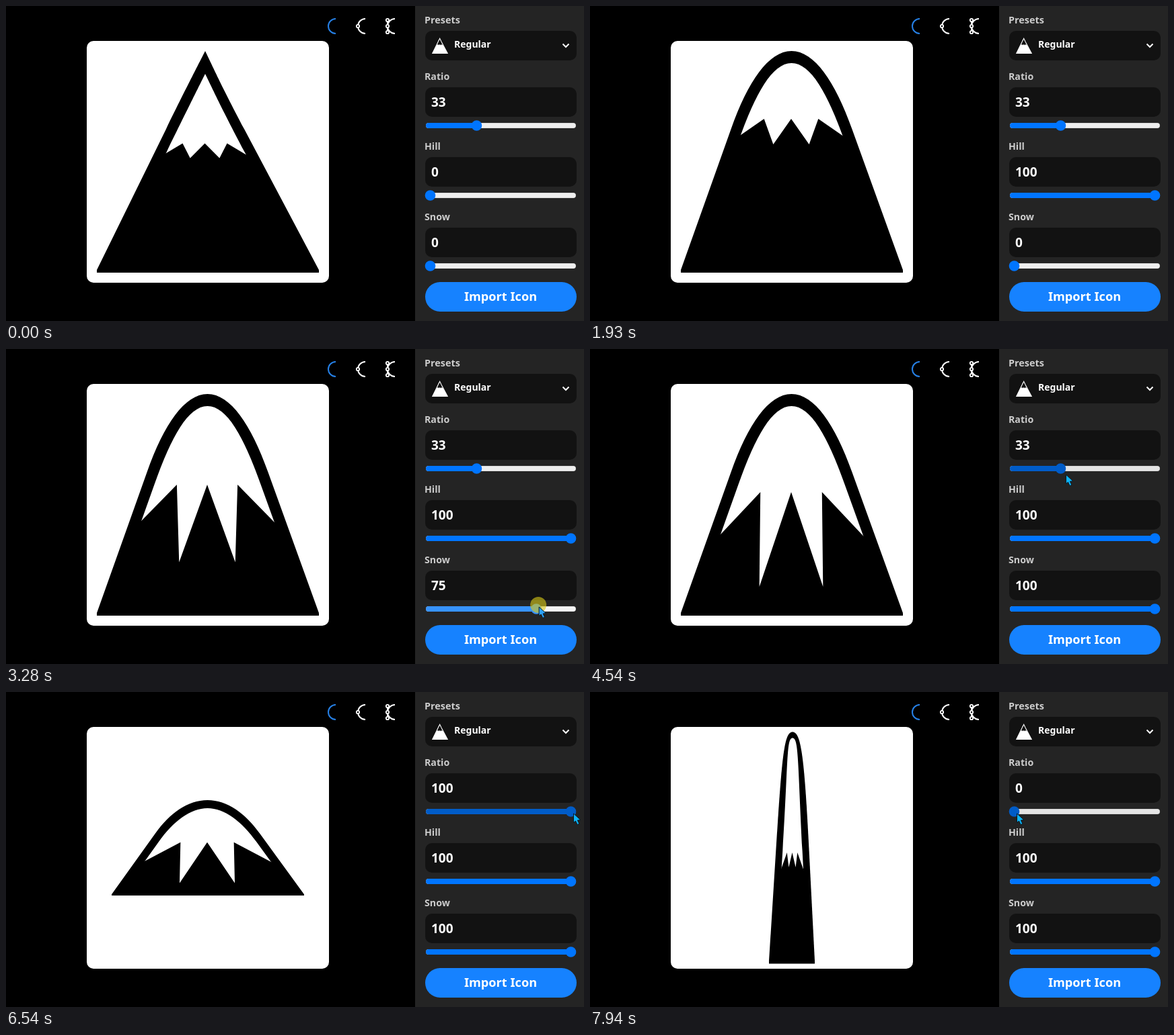
Animation of 859 by 469 pixels, one loop 8000 ms. Source, as an HTML page with a canvas:

```html
<!DOCTYPE html>
<html lang="en">
<head>
<meta charset="utf-8">
<title>Mountain icon editor</title>
<style>
html, body { margin: 0; width: 100%; height: 100%; overflow: hidden; background: #000; }
canvas { display: block; }
</style>
</head>
<body>
<canvas id="stage" width="859" height="469"></canvas>
<script>
const ctx = document.getElementById('stage').getContext('2d');
const LOOP = 8000, STEP = 1000 / 15;
const FONT = '"Noto Sans", "Open Sans", sans-serif';

const lerp = (a, b, k) => a + (b - a) * k;
const clamp = (v, lo, hi) => Math.min(hi, Math.max(lo, v));
const easeOut = k => 1 - (1 - k) ** 4;

const RATIO = { label: 'Ratio', y: 178, start: 33 };
const HILL = { label: 'Hill', y: 282, start: 0 };
const SNOW = { label: 'Snow', y: 387, start: 0 };
const SLIDERS = [RATIO, HILL, SNOW];
const knobX = value => 630.5 + 2.09 * value;

// The pointer glides in to a knob, then drags it past the end of its track
const GRAB = 4, HOLD = 140, REST = 100;
const VISITS = [
  { slider: HILL, enter: 70, x: 720, y: 480, press: 930, done: 1730, from: 0, to: 112, dy: 3 },
  { slider: SNOW, enter: 2060, x: 870, y: 438, press: 2670, done: 3600, from: 0, to: 116, dy: -3 },
  { slider: RATIO, enter: 4080, x: 870, y: 438, press: 4940, done: 5740, from: 33, to: 114, dy: 3 },
  { slider: RATIO, enter: 6200, x: 870, y: 184, press: 6570, done: 6990, from: 100, to: -37, dy: 3 },
  { slider: RATIO, enter: 7440, x: 557, y: 181, press: LOOP, done: LOOP + 1, from: 0, to: 0, dy: 3 }
];

const dragValue = (v, t) => lerp(v.from, v.to, clamp((t - v.press) / (v.done - v.press), 0, 1));

function sliderValue(slider, t) {
  const v = VISITS.filter(v => v.slider === slider && t >= v.press).pop();
  return v ? clamp(dragValue(v, t), 0, 100) : slider.start;
}

function pointer(t) {
  const v = VISITS.filter(v => t >= v.enter).pop() || VISITS[0];
  const k = easeOut(clamp((t - v.enter) / (v.press - REST - v.enter), 0, 1));
  return {
    x: lerp(v.x, knobX(dragValue(v, t)) + GRAB, k),
    y: lerp(v.y, v.slider.y + v.dy, k),
    held: t >= v.press && t < v.done + HOLD ? v.slider : null
  };
}

const CX = 300, CY = 232;

// Ratio 33 is the base form: lower is slimmer, higher is flatter
function shape(ratio, hill, snow) {
  const slim = clamp(1 - ratio / 33, 0, 1);
  const flat = clamp((ratio - 33) / 67, 0, 1) ** 1.41;
  const form = (base, thin, low = base) => slim ? lerp(base, thin, slim) : lerp(base, low, flat);
  return {
    hill, slim,
    w: form(165, 34, 143),
    h: form(330, 345, 142),
    peakX: CX + lerp(-4, lerp(-0.5, 1, slim), hill),
    shoulderX: lerp(0.352, form(0.545, 0.71), hill),
    shoulderY: form(0.352, 0.487),
    reach: form(0.215, 0.39),
    bulge: lerp(0.054, form(0.206, 0.36), hill),
    side: form(17.5, 10, 14),
    crest: lerp(34, form(18, 9, 12), hill),
    snow: {
      half: lerp(lerp(59, 72, hill) + 32 * snow, 15.5, slim),
      top: lerp(lerp(204.5, 168, hill) + 45 * snow, 239, slim),
      dip: lerp(lerp(22, 38, hill) + 103 * snow, 22, slim),
      rim: lerp(lerp(15.5, 22, hill) + 40 * snow, 22, slim),
      peak: lerp(0.56 - 0.12 * snow, 0.5, slim),
      valley: lerp(0.37 + 0.085 * snow, 0.33, slim)
    }
  };
}

function outline(g, inset, drop) {
  const { w, h, hill } = g, top = CY - h / 2, bottom = CY + h / 2;
  const shoulder = top + g.shoulderY * h, foot = top + 0.988 * h;
  const y0 = shoulder + drop, y1 = y0 - g.reach * h;
  const y2 = top + drop + 0.054 * h * (1 - hill);
  const edge = (dir, y) => {
    const k = (y - foot) / (shoulder - foot);
    return lerp(CX + dir * w, g.peakX + dir * g.shoulderX * w, k) - dir * inset;
  };
  const bend = dir => g.peakX + dir * (g.bulge * w - 0.3 * inset * hill);
  ctx.beginPath();
  ctx.moveTo(edge(-1, foot), bottom);
  ctx.lineTo(edge(-1, foot), foot);
  ctx.lineTo(edge(-1, y0), y0);
  ctx.bezierCurveTo(edge(-1, y1), y1, bend(-1), y2, g.peakX, top + drop);
  ctx.bezierCurveTo(bend(1), y2, edge(1, y1), y1, edge(1, y0), y0);
  ctx.lineTo(edge(1, foot), foot);
  ctx.lineTo(edge(1, foot), bottom);
  ctx.closePath();
}

// Three teeth between the slopes; the outer strokes run on past the outline
function snowLine(g) {
  const { half, top, dip, rim, peak, valley } = g.snow;
  const out = 1.5 - peak / 2;
  const arm = [[out, rim * 1.5], [peak, 0], [valley, dip]];
  const left = arm.map(([x, y]) => [-x * half, top + y]);
  const right = left.map(([x, y]) => [-x, y]).reverse();
  const sx = g.slim ? 1 : g.w / 165, sy = g.slim ? 1 : g.h / 330;
  return [...left, [0, top], ...right]
    .map(([x, y]) => [g.peakX - 0.5 + x * sx, CY + (y - CY) * sy]);
}

function mountain(ratio, hill, snow, rock, cap) {
  const g = shape(ratio, hill, snow);
  outline(g, 0, 0);
  ctx.fillStyle = rock;
  ctx.fill();
  ctx.save();
  ctx.beginPath();
  [[120, 52], ...snowLine(g), [480, 52]].forEach(p => ctx.lineTo(...p));
  ctx.clip();
  outline(g, g.side, g.crest);
  ctx.fillStyle = cap;
  ctx.fill();
  ctx.restore();
}

function box(x, y, w, h, r, color) {
  ctx.beginPath();
  ctx.roundRect(x, y, w, h, r);
  ctx.fillStyle = color;
  ctx.fill();
}

function disc(x, y, r, color) {
  ctx.beginPath();
  ctx.arc(x, y, r, 0, 7);
  ctx.fillStyle = color;
  ctx.fill();
}

function line(points, width, color) {
  ctx.beginPath();
  points.forEach(p => ctx.lineTo(...p));
  ctx.lineWidth = width;
  ctx.strokeStyle = color;
  ctx.stroke();
}

function text(s, x, y, size, color, align = 'left') {
  ctx.font = `bold ${size}px ${FONT}`;
  ctx.textAlign = align;
  ctx.fillStyle = color;
  ctx.fillText(s, x, y);
}

function tool(x, color, nodes) {
  const left = x - 11;
  ctx.lineWidth = 2;
  ctx.strokeStyle = color;
  ctx.beginPath();
  ctx.arc(x, 30, 11, Math.PI / 2, Math.PI * 1.5);
  ctx.stroke();
  if (nodes.length > 1) line([[left, 21], [left, 39]], 2, color);
  for (const y of nodes) {
    disc(left, y, 2.2, '#000');
    ctx.lineWidth = 1.8;
    ctx.stroke();
  }
}

function drawSlider(s, value, p) {
  const { y } = s, knob = knobX(value), active = p.held === s;
  const hover = p.x >= 623 && p.x <= 848 && Math.abs(p.y - y) <= 11;
  const onKnob = hover && Math.abs(p.x - knob) < 9;
  const tint = over => active ? '#3793ff' : over ? '#005cc8' : '#0075ff';

  text(s.label, 622, y - 68, 14.2, '#ccc');
  box(623, y - 57, 225, 44, 10, '#121212');
  text(Math.round(value), 632, y - 28, 19, '#fff');
  box(624, y - 4, 223, 8, 4, '#c4c4c4');
  box(624.5, y - 3.5, 222, 7, 3.5, active ? '#f5f5f5' : hover ? '#e5e5e5' : '#efefef');
  box(624, y - 4, knob - 624, 8, [4, 0, 0, 4], tint(hover));
  disc(knob, y, 7.8, tint(onKnob));
}

function panel(values, p) {
  box(608, 0, 251, 469, 0, '#242424');
  text('Presets', 622, 26, 14.4, '#ccc');
  box(623, 37, 225, 44, 10, '#121212');
  ctx.save();
  ctx.translate(645, 59);
  ctx.scale(24 / 330, 24 / 330);
  ctx.translate(-CX, -CY);
  mountain(33, 0, 0, '#fff', '#121212');
  ctx.restore();
  text('Regular', 666, 62, 14, '#fff');
  line([[827.5, 56.5], [832, 61], [836.5, 56.5]], 2, '#fff');
  SLIDERS.forEach((s, i) => drawSlider(s, values[i], p));
  box(623, 411, 225, 44, 22, '#1682ff');
  text('Import Icon', 735, 439, 18.2, '#fff', 'center');
}

function cursor(p) {
  if (p.held) disc(p.x - 1, p.y - 3, 12, 'rgba(214,200,24,.62)');
  ctx.save();
  ctx.translate(p.x, p.y);
  const arrow = new Path2D('M0 0V13.5L3 11L5.6 16.5L8.4 15.2L5.9 10L10.4 9.6Z');
  ctx.fillStyle = p.held ? '#2ea2f8' : '#0cb4fa';
  ctx.fill(arrow);
  ctx.strokeStyle = '#0b1a22';
  ctx.lineWidth = 1;
  ctx.stroke(arrow);
  ctx.restore();
}

function draw(now) {
  const t = Math.floor((now % LOOP + 5) / STEP) * STEP + 8;
  const p = pointer(t);
  const values = SLIDERS.map(s => sliderValue(s, t));
  const [ratio, hill, snow] = values;

  box(0, 0, 859, 469, 0, '#000');
  tool(490, '#2680e6', []);
  tool(534, '#fff', [30]);
  tool(578, '#fff', [21, 30, 39]);
  box(120, 52, 360, 360, 10, '#fff');
  mountain(ratio, hill / 100, snow / 100, '#000', '#fff');
  panel(values, p);
  cursor(p);
}

const begin = performance.now();
function loop() {
  draw(performance.now() - begin);
  requestAnimationFrame(loop);
}
loop();
</script>
</body>
</html>
```
